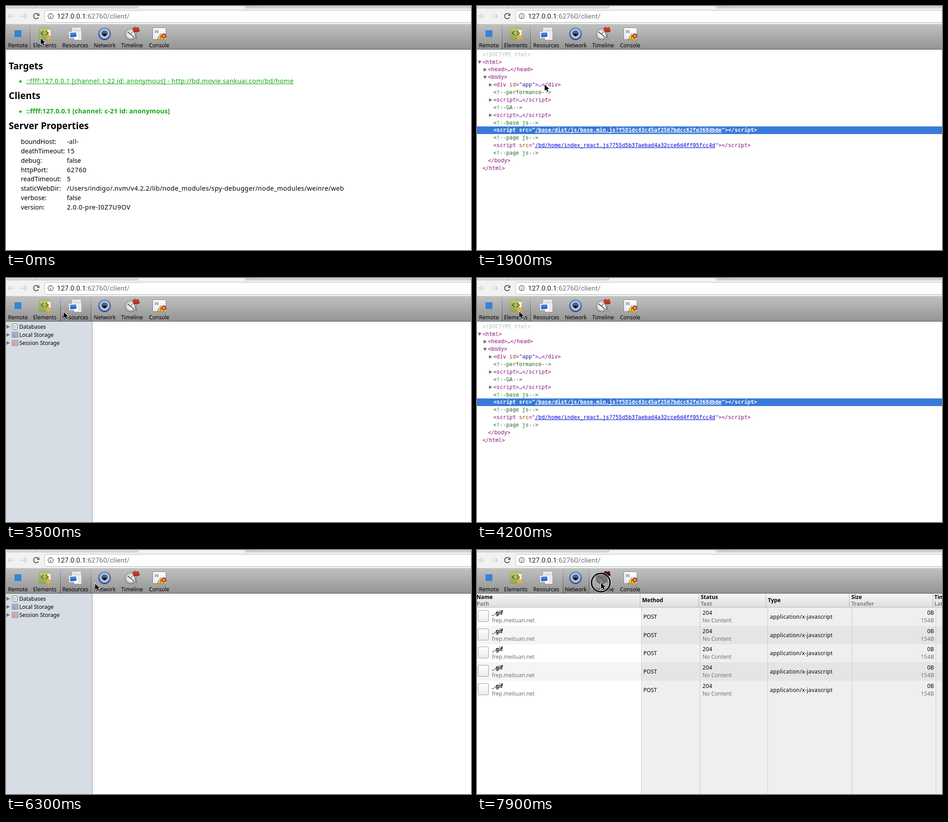
Write an HTML page with a canvas that moves like this. It is 1031 px wide and 543 px high and loops after 8 s.

```html
<!DOCTYPE html>
<html lang="en">
<head>
<meta charset="utf-8">
<title>Remote inspector</title>
<style>
html, body { margin: 0; width: 1031px; height: 543px; overflow: hidden; background: #fff; }
canvas { display: block; }
</style>
</head>
<body>
<canvas id="stage" width="1031" height="543"></canvas>
<script>
const g = document.getElementById('stage').getContext('2d');
const W = 1031, H = 543, LOOP = 8000;
const SANS = '"Noto Sans", "Open Sans", sans-serif';
const MONO = '"DejaVu Sans Mono", monospace';

function rect(x, y, w, h, fill) {
  g.fillStyle = fill;
  g.fillRect(x, y, w, h);
}

function grad(y0, y1, a, b) {
  const f = g.createLinearGradient(0, y0, 0, y1);
  f.addColorStop(0, a);
  f.addColorStop(1, b);
  return f;
}

function box(x, y, w, h, r, fill, line) {
  g.beginPath();
  g.roundRect(x, y, w, h, r);
  paint(fill, line);
}

function disc(x, y, r, fill, line, width) {
  g.beginPath();
  g.arc(x, y, r, 0, Math.PI * 2);
  paint(fill, line, width);
}

function poly(points, fill, line, width) {
  g.beginPath();
  points.forEach(([x, y]) => g.lineTo(x, y));
  g.closePath();
  paint(fill, line, width);
}

function stroke(points, color, width) {
  g.beginPath();
  points.forEach(([x, y]) => g.lineTo(x, y));
  paint(null, color, width);
}

function paint(fill, line, width = 1) {
  if (fill) { g.fillStyle = fill; g.fill(); }
  if (line) { g.strokeStyle = line; g.lineWidth = width; g.stroke(); }
}

// Draws a string on its baseline and returns its width.
function text(s, x, y, font, color = '#000', spacing = 0, align = 'left') {
  g.font = font;
  g.letterSpacing = spacing + 'px';
  g.textAlign = align;
  g.fillStyle = color;
  g.fillText(s, x, y);
  return g.measureText(s).width;
}

function arrow(x, y, open) {
  poly(open ? [[x - 4, y - 3], [x + 4, y - 3], [x, y + 4]]
            : [[x - 3, y - 4], [x + 4, y], [x - 3, y + 4]], '#6b6b6b');
}

function drawBrowser() {
  rect(0, 0, W, 41, '#f2f2f2');
  rect(0, 0, 292, 4, '#dcdcdc');
  rect(531, 0, 500, 4, '#d4d4d4');
  rect(0, 4, 292, 1, '#b2b2b2');
  rect(531, 4, 500, 1, '#b2b2b2');
  stroke([[66, 4], [68, 0]], '#a8a8a8');
  stroke([[291, 4.5], [294, 0]], '#a8a8a8');
  stroke([[528, 0], [532, 4.5]], '#a8a8a8');
  rect(537, 0, 22, 1, '#b9b9b9');
  for (const [x, dir] of [[12, -1], [39, 1]]) {
    stroke([[x - 7, 22.5], [x + 7, 22.5]], '#cdcdcd', 1.7);
    stroke([[x + dir, 16.5], [x + 7 * dir, 22.5], [x + dir, 28.5]], '#cdcdcd', 1.7);
  }
  g.beginPath();
  g.arc(67, 22.5, 5.8, 0.5, 5.6);
  paint(null, '#5a5a5a', 2);
  poly([[74, 16], [74, 22], [68, 22]], '#5a5a5a');
  box(85.5, 9.5, 960, 27, 4, '#fff', '#b8b8b8');
  disc(99, 22.5, 5.7, null, '#666', 1.4);
  rect(98.3, 21.5, 1.5, 4.5, '#666');
  rect(98.3, 18.8, 1.5, 1.6, '#666');
  const font = '15.2px Roboto, sans-serif';
  const w = text('127.0.0.1', 113, 28, font, '#1c1c1c', 0.1);
  text(':62760/client/', 113 + w, 28, font, '#707070', 0.1);
}

function iconRemote() {
  rect(19, 54, 15, 15, '#2f86d8');
}

function iconElements() {
  box(73.5, 48.5, 24, 26, 3, grad(48, 75, '#c3cd76', '#93a54c'), '#8b9c4a');
  box(91.5, 52.5, 8, 21, 2, '#f2f1e2', '#b5b089');
  stroke([[83, 56], [78, 60.5], [83, 65]], '#4b6b28', 2);
  stroke([[88, 56], [94, 60.5], [88, 65]], '#4b6b28', 2);
  for (let i = 0; i < 8; i++) {
    const a = i * Math.PI / 4;
    disc(93.5 + 5 * Math.cos(a), 70 + 5 * Math.sin(a), 1.5, '#d69d22');
  }
  disc(93.5, 70, 4.8, '#e9b63c');
  disc(93.5, 70, 1.8, '#fff2c0', '#a8761b');
}

function iconResources() {
  box(146.5, 47.5, 20, 23, 1, '#f7f7f7', '#a5a5a5');
  for (let y = 50; y < 69; y += 3) rect(149, y, 14, 1, '#cacaca');
  box(150.5, 55.5, 17, 20, 1, '#fafafa', '#a5a5a5');
  for (let y = 59; y < 74; y += 3) rect(160, y, 6, 1, '#c4c4c4');
  g.save();
  g.translate(149, 64);
  g.rotate(-0.12);
  rect(-9, -7, 18, 14, '#fff');
  rect(-7, -5, 14, 10, grad(-5, 5, '#5597ef', '#1457bb'));
  g.restore();
}

function iconNetwork() {
  disc(218.5, 62, 13.7, grad(48, 76, '#8ba6d6', '#24488e'), '#56678a');
  disc(218.5, 62, 9.3, grad(52, 72, '#3a5fa8', '#8db6ee'), '#dde8f8', 2);
  poly([[213.5, 57.5], [223.5, 57.5], [223.5, 64.5], [221, 64.5], [221, 67], [216, 67],
    [216, 64.5], [213.5, 64.5]], '#17191f');
  for (let x = 214.7; x < 223; x += 2.3) rect(x, 57.5, 1, 3.5, '#d9c99b');
}

function iconTimeline() {
  disc(276.5, 63, 12.4, grad(50, 76, '#f6f6f6', '#a5a5a5'), '#777', 1.2);
  disc(276.5, 63, 9.8, '#efefef', '#999');
  for (let i = 0; i < 12; i++) {
    const a = i * Math.PI / 6;
    disc(276.5 + 8 * Math.cos(a), 63 + 8 * Math.sin(a), 0.6, '#666');
  }
  stroke([[270, 58], [276.5, 63], [283, 69]], '#333', 1.6);
  stroke([[276.5, 63], [281, 56]], '#444', 1.1);
  stroke([[281, 50], [291, 74]], '#83735c', 1.5);
  poly([[281, 50], [285, 47], [289, 49], [293, 47], [296, 56], [291, 58], [288, 57], [284, 59]],
    grad(46, 59, '#dd4a30', '#ae2413'), '#962a18');
}

function iconConsole() {
  box(325.5, 48.5, 29, 26, 1, grad(48, 75, '#fff', '#e6ebf2'), '#858585');
  stroke([[330, 54], [334, 57], [330, 60]], '#3566b0', 1.5);
  rect(336, 53, 1.3, 8, '#3566b0');
  poly([[343, 61], [352, 75], [334, 75]], grad(60, 75, '#ffe77c', '#e0ad22'), '#a98627');
  rect(342.3, 65.5, 1.5, 4.5, '#5d4510');
  rect(342.3, 71.5, 1.5, 1.5, '#5d4510');
  disc(350, 66.5, 5, '#d23f2d', '#9b2a1e');
  stroke([[348, 64.5], [352, 68.5]], '#f6d5d0', 1.1);
  stroke([[352, 64.5], [348, 68.5]], '#f6d5d0', 1.1);
}

// label, centre, left edge, right edge, icon
const TABS = [
  ['Remote', 26.5, -1, 53, iconRemote],
  ['Elements', 86, 55, 118, iconElements],
  ['Resources', 153.5, 120, 188, iconResources],
  ['Network', 219, 190, 248, iconNetwork],
  ['Timeline', 279.5, 250, 312, iconTimeline],
  ['Console', 339.5, 314, 366, iconConsole]
];

function drawToolbar(active, pressed) {
  rect(0, 40, W, 1, '#d0d0d0');
  rect(0, 41, W, 55, grad(41, 96, '#c0c0c0', '#949494'));
  rect(0, 96, W, 1, '#555');
  TABS.forEach(([label, x, left, right, icon], i) => {
    if (i === active) {
      rect(left, 41, right - left, 55, grad(41, 96, 'rgba(0,0,0,0)', 'rgba(0,0,0,.06)'));
      for (const edge of [left, right]) {
        rect(edge, 43, 1, 53, grad(43, 96, 'rgba(40,40,40,.2)', 'rgba(40,40,40,.75)'));
      }
    }
    g.save();
    if (i === pressed) g.filter = 'brightness(0.4) saturate(0.9)';
    icon();
    g.restore();
    text(label, x, 92, '12px ' + SANS, '#000', 0, 'center');
  });
}

const PROPS = [
  ['boundHost:', '-all-', 0.4],
  ['deathTimeout:', '15', 0.6],
  ['debug:', 'false', 0],
  ['httpPort:', '62760', 0.65],
  ['readTimeout:', '5', 0],
  ['staticWebDir:', '/Users/indigo/.nvm/v4.2.2/lib/node_modules/spy-debugger/node_modules/weinre/web', 0.4],
  ['verbose:', 'false', 0],
  ['version:', '2.0.0-pre-I0Z7U9OV', 0.6]
];

function drawRemote() {
  const head = 'bold 20.5px ' + SANS, body = '14.2px ' + SANS, green = '#0fa80f';
  text('Targets', 6, 140.5, head);
  text('Clients', 6, 207, head);
  text('Server Properties', 6, 273.5, head);
  disc(32, 168, 2.6, green);
  disc(32, 235, 2.6, green);
  const w = text('::ffff:127.0.0.1 [channel: t-22 id: anonymous] - http://bd.movie.sankuai.com/bd/home',
    45, 172, body, green, 0.36);
  rect(45, 173, w, 1, green);
  text('::ffff:127.0.0.1 [channel: c-21 id: anonymous]', 45, 239, 'bold ' + body, green, 0.22);
  PROPS.forEach(([key, value, spacing], i) => {
    const y = 307 + i * 20.85;
    text(key, 33, y, body);
    text(value, 135, y, body, '#000', spacing);
  });
}

const TAG = '#881280', ATTR = '#994500', VALUE = '#1a1aa6', NOTE = '#236e25', LINK = '#0000d8';
const ROW = 16.87, DOM_TOP = 99.5;
const tag = s => [[s, TAG]];
const note = s => [['<!--' + s + '-->', NOTE]];
const script = src => [['<script ', TAG], ['src', ATTR], ['="', TAG], [src, LINK], ['"><\/script>', TAG]];

// depth, arrow (0 none, 1 closed, 2 open), coloured pieces
const DOM = [
  [0, 0, [['<!DOCTYPE html>', '#c0c0c0']]],
  [0, 2, tag('<html>')],
  [1, 1, tag('<head>…</head>')],
  [1, 2, tag('<body>')],
  [2, 1, [['<div ', TAG], ['id', ATTR], ['="', TAG], ['app', VALUE], ['">…</div>', TAG]]],
  [2, 0, note('performance')],
  [2, 1, tag('<script>…<\/script>')],
  [2, 0, note('GA')],
  [2, 1, tag('<script>…<\/script>')],
  [2, 0, note('base js')],
  [2, 0, script('/base/dist/js/base.min.js?f581dc43c45af2567bdcc62fe368dbde')],
  [2, 0, note('page js')],
  [2, 0, script('/bd/home/index_react.js?755d5b37aebad4a32cce6d4ff95fcc4d')],
  [2, 0, note('page js')],
  [1, 0, tag('</body>')],
  [0, 0, tag('</html>')]
];

function drawElements(selected, hover) {
  DOM.forEach(([depth, mark, parts], i) => {
    const top = DOM_TOP + i * ROW, on = i === selected;
    const y0 = Math.round(top), h = Math.round(top + ROW) - y0;
    if (on) rect(0, y0, W, h, '#3879d9');
    else if (i === hover) rect(0, y0, W, h, '#ecf3fb');
    let x = 12.2 + depth * 12;
    if (mark) arrow(x - 6.5, top + 8.5, mark === 2);
    for (const [s, color] of parts) {
      const ink = on ? '#fff' : color;
      const w = text(s, x, top + 12.2, (on ? 'bold ' : '') + '11.85px ' + MONO, ink);
      if (color === LINK) rect(x, Math.round(top + 13), w, 1, ink);
      x += w;
    }
  });
}

function drawResources() {
  rect(0, 97, 191, H - 97, '#d6dde5');
  rect(191, 97, 1, H - 97, '#9a9fa6');
  ['Databases', 'Local Storage', 'Session Storage'].forEach((label, i) => {
    const y = 108.5 + i * 18;
    arrow(4.5, y, false);
    text(label, 29.5, y + 4.3, '12px ' + SANS);
    if (i === 0) {
      box(14, y - 7, 12, 14, 4, '#e9e9e9', '#8d8d8d');
      for (let k = -3; k < 6; k += 4) stroke([[14, y + k], [20, y + k + 1.5], [26, y + k]], '#a2a2a2', 1);
      return;
    }
    box(13.5, y - 6, 13, 12, 0, i === 1 ? '#b9cbe2' : '#ebc9c5', '#7b8089');
    const ink = i === 1 ? '#6881a5' : '#ab7c78';
    for (let k = -3; k < 6; k += 3) rect(14, y + k, 12, 1, ink);
    rect(18, y - 6, 1, 12, ink);
  });
}

function drawNetwork() {
  const plain = '12px ' + SANS, bold = 'bold ' + plain, grey = '#707070', rowH = 40.65;
  rect(364, 128, W - 364, H - 128, '#efefef');
  for (let i = 0; i < 5; i++) {
    const y = Math.round(128 + i * rowH);
    if (i % 2) {
      rect(0, y, 364, 41, '#f5f5f5');
      rect(364, y, W - 364, 41, '#e5e5e5');
    }
    box(2.5, y + 6.5, 23, 25, 1, grad(y + 6, y + 32, '#fff', '#ebebeb'), '#9a9a9a');
    text('_.gif', 33, y + 16, bold);
    text('frep.meituan.net', 33, y + 32.5, plain, grey);
    text('POST', 369, y + 24.5, plain);
    text('204', 500, y + 16, plain, '#000', 0.4);
    text('No Content', 500, y + 32.5, plain, grey);
    text('application/x-javascript', 649.5, y + 24.5, plain, '#000', 0.35);
    text('0B', 1013, y + 16, plain, '#000', 0, 'right');
    text('154B', 1013.5, y + 32.5, plain, grey, 0.3, 'right');
  }
  for (const x of [364, 494, 644, 831, 1017]) rect(x, 128, 1, H - 128, '#c9c9c9');

  rect(0, 97, W, 30, grad(97, 127, '#f6f6f6', '#dedede'));
  rect(0, 127, W, 1, '#b4b4b4');
  for (const x of [361, 491, 640, 825, 1010]) rect(x, 97, 1, 30, '#b3b3b3');
  const heads = [[-1, 'Name', 'Path'], [366, 'Method'], [496, 'Status', 'Text'],
    [645, 'Type'], [830, 'Size', 'Transfer'], [1014, 'Time', 'Latency']];
  for (const [x, top, sub] of heads) {
    text(top, x, sub ? 109 : 116, bold);
    if (sub) text(sub, x, 123.5, bold, '#808080');
  }
}

// time, x, y of the pointer tip
const PATH = [
  [0, 77, 72], [500, 78, 73], [900, 88, 88], [1300, 104, 120], [1500, 130, 312],
  [1700, 142, 274], [1800, 142, 274], [2000, 158, 76], [2100, 158, 76], [2300, 250, 270],
  [2700, 235, 92], [3000, 232, 78], [3400, 140, 76], [3700, 93, 75], [4500, 94, 75],
  [5200, 120, 76], [5600, 168, 75], [6000, 168, 75], [6400, 203, 75], [7200, 204, 75],
  [7700, 275, 73], [8000, 275, 73]
];

// start, end, toolbar button (-1 for none)
const CLICKS = [[200, 400, 1], [1700, 1800, -1], [2000, 2200, 2], [3800, 4000, 1],
  [5700, 5900, 2], [6500, 6700, 3], [7800, 8000, 4]];

// start, panel index
const PANELS = [[0, 0], [400, 1], [2100, 2], [4000, 1], [5900, 2], [6600, 3]];

function pointer(t) {
  const i = PATH.findIndex(p => p[0] > t);
  const [t0, x0, y0] = PATH[i - 1], [t1, x1, y1] = PATH[i];
  const k = (t - t0) / (t1 - t0), e = k * k * (3 - 2 * k);
  return [x0 + (x1 - x0) * e, y0 + (y1 - y0) * e];
}

function drawPointer(x, y) {
  const shape = [[0, 0], [0, 13.5], [3.2, 10.6], [5.6, 16], [8, 15], [5.7, 9.8], [10, 9.6]];
  g.save();
  g.translate(x, y);
  poly(shape, '#000', '#fff', 1.8);
  poly(shape, '#000');
  g.restore();
}

function drawRing(x, y) {
  disc(x, y, 20.5, 'rgba(175,175,175,.4)', 'rgba(255,255,255,.7)', 5);
  disc(x, y, 20.5, null, '#000', 3);
}

function draw(t) {
  const panel = PANELS.filter(p => p[0] <= t).pop()[1];
  const click = CLICKS.find(c => t >= c[0] && t < c[1]);
  const [x, y] = pointer(t);
  const held = click && (t < click[0] + 100 || click[2] === 4);
  rect(0, 0, W, H, '#fff');
  if (panel === 0) drawRemote();
  if (panel === 1) {
    const row = Math.floor((y - DOM_TOP) / ROW);
    drawElements(t < 1700 ? 3 : 10, t < 1900 ? row : -1);
  }
  if (panel === 2) drawResources();
  if (panel === 3) drawNetwork();
  drawBrowser();
  drawToolbar(panel, held ? click[2] : -1);
  if (click) drawRing(x - 0.5, y - 0.5);
  drawPointer(x, y);
}

function tick(now) {
  draw(Math.floor(now % LOOP / 100) * 100);
  requestAnimationFrame(tick);
}
draw(0);
requestAnimationFrame(tick);
</script>
</body>
</html>
```
